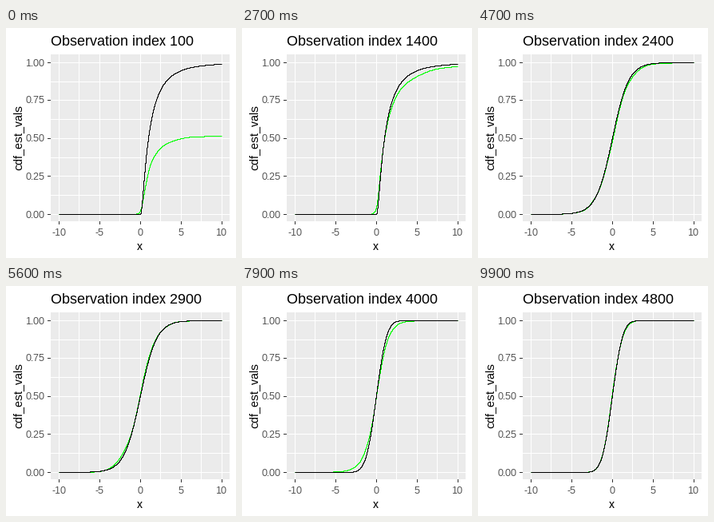
Animation, 288 px wide and 288 px high, one loop 10 s. Source, as a matplotlib script:

```python
import math

import numpy as np
import matplotlib.pyplot as plt
from matplotlib.animation import FuncAnimation
from matplotlib.patches import Rectangle

SIZE, DPI = 288, 96
PX = 72 / DPI                      # one pixel in points
FRAMES, INTERVAL = 100, 100
STATES, STEP = 48, 100
SWITCHES = (2000, 3900)            # where the sampled distribution changes
DECAY = 0.0073                     # exponential forgetting rate
JITTER = 0.65                      # share of the sampling noise that shows
LEFT, TOP, RIGHT, BOTTOM = 56, 33, 280, 242

plt.rcParams.update({
    "font.family": "Liberation Sans",
    "text.hinting": "native",
    "text.hinting_factor": 1,
    "path.simplify": False,
})
rng = np.random.default_rng(7)

# --- true distributions -------------------------------------------------
x = np.linspace(-10, 10, 401)
phi = np.vectorize(lambda z: 0.5 * (1 + math.erf(z / math.sqrt(2))))
lognormal = np.where(x > 0, phi(np.log(np.maximum(x, 1e-9))), 0)
logistic = 1 / (1 + np.exp(-x))
truth = np.array([lognormal, logistic, phi(x)])

counts = STEP * np.arange(1, STATES + 1)
actual = truth[np.searchsorted(SWITCHES, counts, side="right")]

# --- exponentially weighted, smoothed estimate of the CDF ---------------
total = STATES * STEP
order = np.arange(1, total + 1)
source = np.searchsorted(SWITCHES, order, side="left")
samples = np.choose(source, [rng.lognormal(sigma=1.15, size=total),
                             rng.logistic(size=total),
                             rng.normal(size=total)])
age = counts[:, None] - order
weights = np.where(age >= 0, DECAY * (1 - DECAY) ** np.maximum(age, 0), 0)
width = 0.25 + 0.08 * np.abs(samples)
kernel = 0.5 + 0.5 * np.tanh(0.8 * (x - samples[:, None]) / width[:, None])
expected = weights @ truth[source]
estimates = expected + JITTER * (weights @ kernel - expected)


# --- drawing helpers ----------------------------------------------------
def pixel(v):
    """Centre of the pixel that holds v."""
    return np.floor(v) + 0.5


def to_x(v):
    return pixel(66.4 + 10.19 * (v + 10))


def to_y(v):
    return pixel(233.4 - 190 * v)


fig = plt.figure(figsize=(SIZE / DPI, SIZE / DPI), dpi=DPI, facecolor="white")
ax = fig.add_axes([0, 0, 1, 1])
ax.set(xlim=(0, SIZE), ylim=(SIZE, 0))
ax.axis("off")


def stroke(xs, ys, color, z=2):
    return ax.plot(xs, ys, color=color, lw=PX, zorder=z, snap=False,
                   solid_capstyle="butt", solid_joinstyle="miter")[0]


def label(px, py, s, size, color="black", **kw):
    return ax.text(px, py, s, fontsize=size * PX, color=color,
                   va="baseline", **kw)


# --- panel, grid and axes -----------------------------------------------
ax.add_patch(Rectangle((LEFT, TOP), RIGHT - LEFT, BOTTOM - TOP,
                       fc="#EBEBEB", lw=0, aa=False))

for v in np.arange(-10, 10.1, 2.5):
    gx = to_x(v)
    stroke([gx, gx], [TOP, BOTTOM], "white")
    if v % 5 == 0:
        stroke([gx, gx], [BOTTOM, BOTTOM + 4], "#333333")
        label(gx - 0.5, 260, f"{v:.0f}", 12, "#4D4D4D", ha="center")

for v in np.arange(0, 1.01, 0.125):
    gy = to_y(v)
    stroke([LEFT, RIGHT], [gy, gy], "white")
    if v % 0.25 == 0:
        stroke([LEFT - 4, LEFT], [gy, gy], "#333333")
        label(49, gy + 4, f"{v:.2f}", 12, "#4D4D4D", ha="right")

label(167.5, 278, "x", 15, ha="center")
label(19, 137, "cdf_est_vals", 15, ha="center", rotation=90,
      rotation_mode="anchor")

# Fine steps on whole pixels keep the curves crisp and one pixel wide
fine = np.linspace(-10, 10, 3001)
title = label(LEFT, 22, "", 18)
green = stroke(to_x(fine), to_y(0 * fine), "#00FF00", 4)
black = stroke(to_x(fine), to_y(0 * fine), "black", 5)


# --- motion -------------------------------------------------------------
def phase(n):
    """State and blend; the last few states are held one frame longer."""
    if n < 84:
        k, r = divmod(n, 2)
        return k, r / 2
    k, r = divmod(n - 84, 3)
    return 42 + k, 0.5 if r == 2 else 0


def tween(curves, k, t):
    end = curves[min(k + 1, STATES - 1)]
    return np.interp(fine, x, curves[k] + t * (end - curves[k]))


def update(n):
    k, t = phase(n)
    title.set_text(f"Observation index {counts[k]}")
    green.set_ydata(to_y(tween(estimates, k, t)))
    black.set_ydata(to_y(tween(actual, k, t)))
    return title, green, black


anim = FuncAnimation(fig, update, frames=FRAMES, interval=INTERVAL,
                     repeat=True)
plt.show()
```
